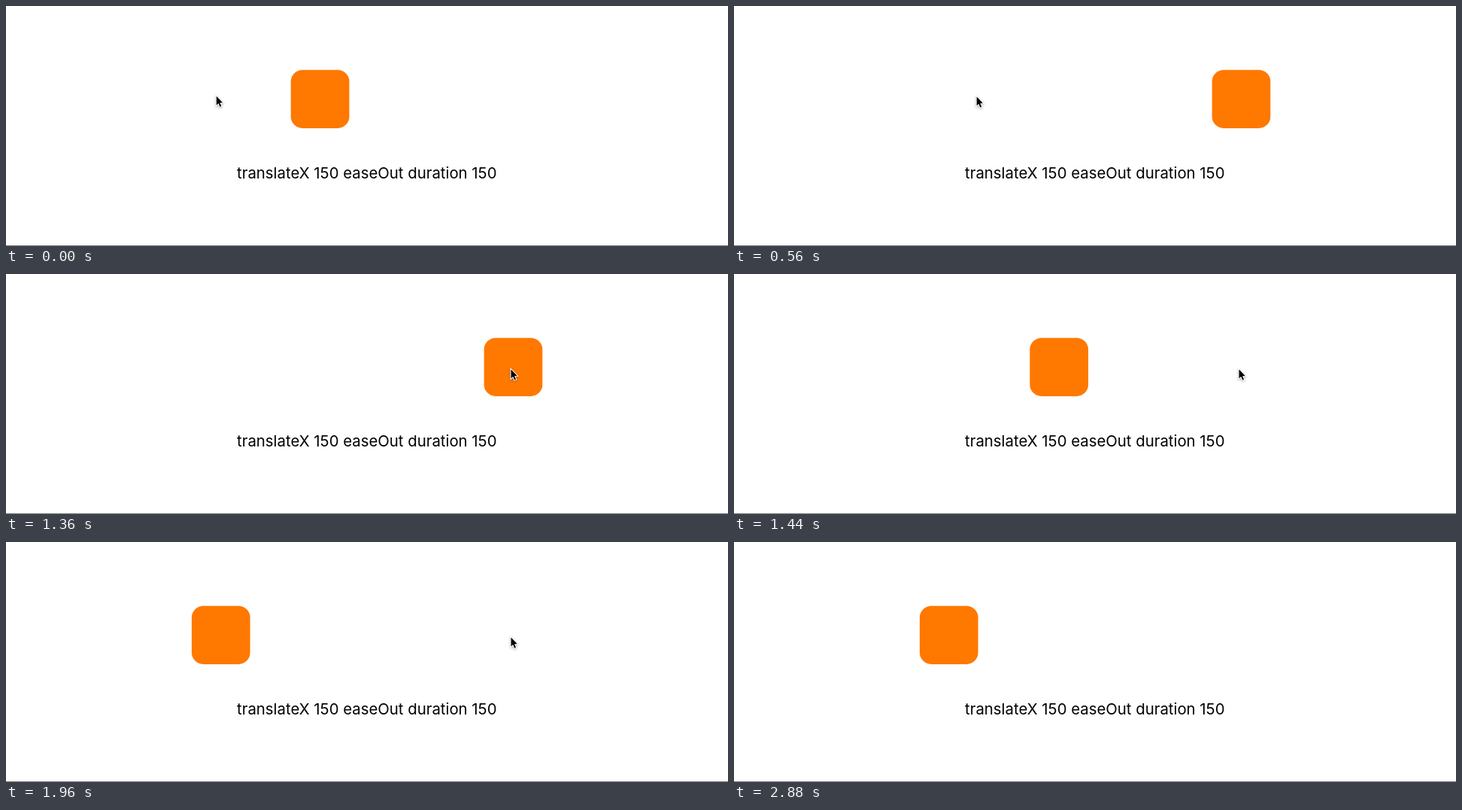
Animation of 960 by 320 pixels, one loop 2920 ms. Source, as an HTML page with a canvas:

```html
<!DOCTYPE html>
<html lang="en">
<head>
<meta charset="utf-8">
<title>translateX easeOut</title>
<style>
  html, body { margin: 0; width: 100%; height: 100%; overflow: hidden; background: #fff; }
  canvas { display: block; width: 960px; height: 320px; }
</style>
</head>
<body>
<canvas id="stage" width="960" height="320"></canvas>
<script>
const ctx = document.getElementById('stage').getContext('2d');
const LOOP = 2920, STEP = 40;
const LEFT = 246.9, RIGHT = 635.6, SIZE = 77.7;

const clamp = v => Math.min(1, Math.max(0, v));
const mix = (a, b, p) => a + (b - a) * p;
const span = (t, start, length) => clamp((t - start) / length);
const inOutQuad = p => p < 0.5 ? 2 * p * p : 1 - 2 * (1 - p) ** 2;

// cubic-bezier(0, 0, 0.58, 1), solved by bisection
function easeOut(x) {
  let lo = 0, hi = 1;
  for (let i = 0; i < 24; i++) {
    const s = (lo + hi) / 2;
    if (1.74 * (1 - s) * s * s + s ** 3 < x) lo = s; else hi = s;
  }
  return lo * lo * (3 - 2 * lo);
}

function boxX(t) {
  return t < 1373
    ? mix(LEFT, RIGHT, easeOut(span(t, -38.6, 174)))
    : mix(RIGHT, LEFT, easeOut(span(t, 1373.3, 150)));
}

// Glides to the box, rests for the click, then flicks up and away
function cursorAt(t) {
  if (t >= 2380) return null;
  if (t < 2200) {
    const p = inOutQuad(span(t, 450, 470));
    return [mix(279.8, 671.5, p), mix(120.2, 127.2, p)];
  }
  const u = (t - 2200) / 120;
  return [671.5 + 5.8 * u ** 4.2, 127.2 - 23 * u ** 3.3];
}

function drawBox(x) {
  ctx.fillStyle = '#ff7800';
  ctx.beginPath();
  ctx.roundRect(x, 85.2, SIZE, SIZE, 15.5);
  ctx.fill();
}

function drawCursor([x, y]) {
  const arrow = new Path2D('M0 0V12L2.7 9.5L4.7 14.2L6.5 13.4L4.6 8.8L8.2 8.5Z');
  ctx.save();
  ctx.translate(x, y);
  ctx.lineWidth = 2;
  ctx.strokeStyle = '#fff';
  ctx.shadowColor = 'rgba(0,0,0,.35)';
  ctx.shadowBlur = 3;
  ctx.shadowOffsetY = 1;
  ctx.stroke(arrow);
  ctx.shadowColor = 'transparent';
  ctx.fillStyle = '#000';
  ctx.fill(arrow);
  ctx.restore();
}

function draw(t) {
  ctx.fillStyle = '#fff';
  ctx.fillRect(0, 0, 960, 320);
  ctx.fillStyle = '#808080';
  ctx.fillRect(0, 319, 960, 1);

  ctx.fillStyle = '#000';
  ctx.font = '20.35px Inter, "Open Sans", sans-serif';
  ctx.textAlign = 'center';
  ctx.fillText('translateX 150 easeOut duration 150', 479.8, 230);

  drawBox(boxX(t));
  const cursor = cursorAt(t);
  if (cursor) drawCursor(cursor);
}

function tick() {
  const t = performance.now() % LOOP;
  draw(Math.floor(t / STEP) * STEP);
  requestAnimationFrame(tick);
}
tick();
</script>
</body>
</html>
```
